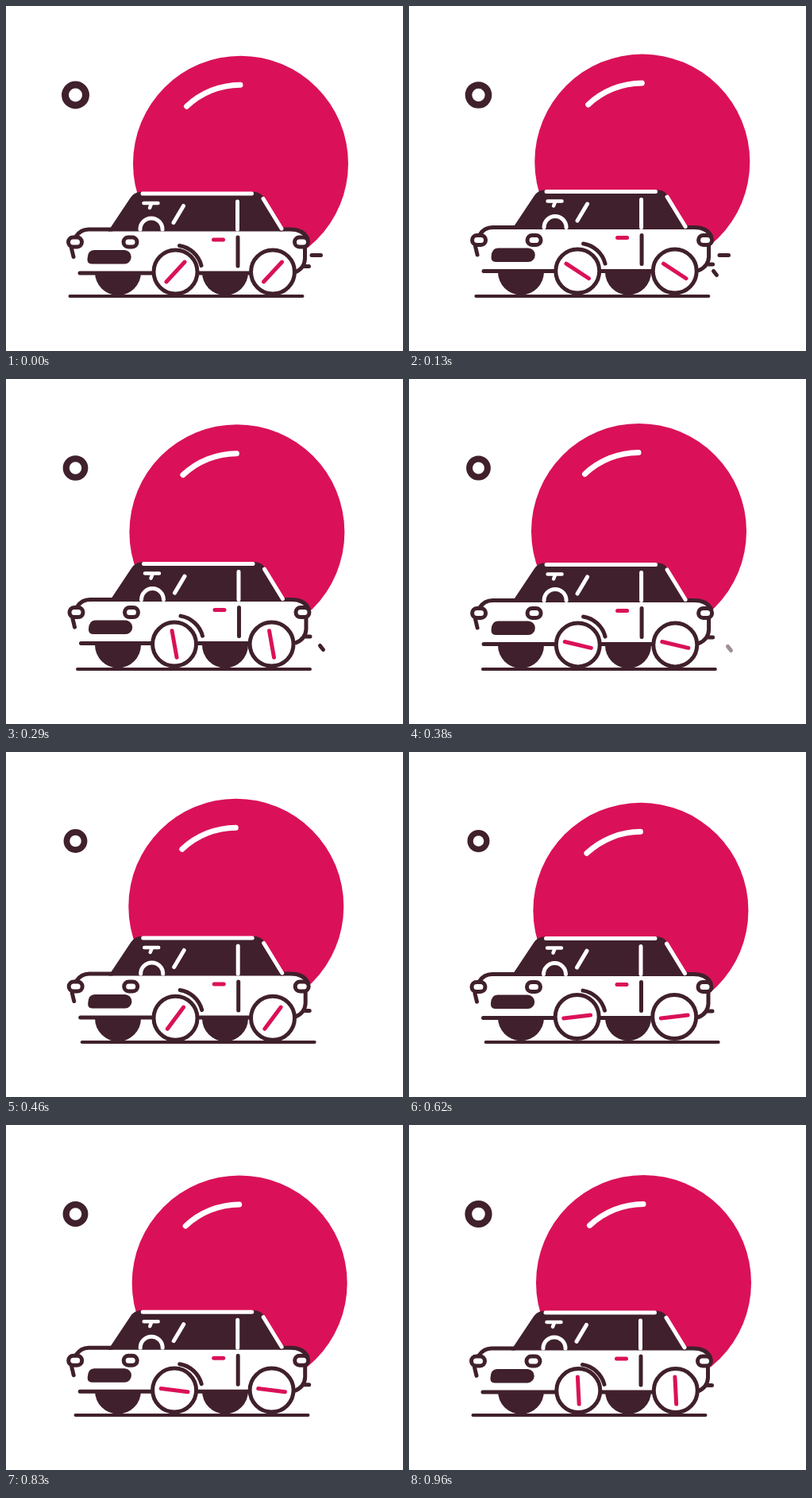
These frames come from a looping animation (500x434 px, 1000 ms). An HTML page:

```html
<!DOCTYPE html>
<html lang="en">
<head>
<meta charset="utf-8">
<title>Little car</title>
<style>
  html, body { margin: 0; width: 100%; height: 100%; overflow: hidden; background: #fff; }
  svg { display: block; width: 500px; height: 434px; }
  .line { fill: none; stroke-width: 5; stroke-linecap: round; stroke-linejoin: round; }
  .dark { stroke: #40202c; }
  .white { stroke: #fff; }
  .pink { stroke: #da1158; }
  .ink { fill: #40202c; }
  .paper { fill: #fff; }
</style>
</head>
<body>
<svg viewBox="0 0 500 434">
  <circle id="ring" r="13" class="line dark" style="stroke-width:9"/>

  <g id="ball">
    <circle r="135.5" fill="#da1158"/>
    <path class="line white" style="stroke-width:7" d="M-68-72A99 99 0 0 1-.5-99"/>
  </g>

  <path id="puffA" class="line dark" d="M-6 0H5.5"/>
  <path id="puffB" class="line dark" d="M-2-2.5L2 2.5"/>
  <path id="ground" class="line dark" style="stroke-width:4" d="M80.5 365H373.5"/>

  <g id="farWheels" class="ink">
    <circle cx="141" cy="335" r="29"/>
    <circle cx="276" cy="335" r="29"/>
  </g>

  <g id="body">
    <path class="line dark" d="M374 327.5H381.5"/>
    <path class="paper" d="M105 281H360Q378 283 378 297V318Q377 334 366 336H93L81 300Q90 283 105 281Z"/>
    <path class="ink" d="M128.5 283.5L156.5 241.5Q161 234.500 168 234H314Q321 235 324 240L348 283.5Z"/>
    <path class="line dark" d="M133 281H104Q94 281 88 290M346 281H358Q374 281 379.5 292
      M82.5 305L85 315.5M93 336H187M240 336H309
      M376.5 303V318Q376 330 364 335M292 291V327M218.5 301.5A34 34 0 0 1 246 326.5"/>
    <path class="ink" d="M111 307H149A8.5 8.5 0 0 1 149 324.5H108Q102 324.500 102.500 318Q103 307 111 307Z"/>
    <path class="line white" d="M172 236H309.5M324 242.5L347 280M291.5 246V281M223.5 251.5L211 272.5"/>
    <path class="line white" style="stroke-width:4.5" d="M173.5 248H191.5M183 249L181 254"/>
    <path class="line white" d="M169 281A14 14 0 1 1 197 281"/>
    <path class="line pink" d="M261.5 294H273.5"/>
    <g class="line dark" style="fill:#fff">
      <rect x="78.5" y="291" width="17" height="12" rx="6"/>
      <rect x="148" y="291" width="17" height="12" rx="6"/>
      <rect x="363.5" y="291" width="17" height="12" rx="6"/>
    </g>
  </g>

  <g id="wheels">
    <g transform="translate(213.5 334.5)">
      <circle r="27.5" class="line dark" style="fill:#fff"/>
      <path class="line pink spoke" d="M-17 0H17"/>
    </g>
    <g transform="translate(336 334.5)">
      <circle r="27.5" class="line dark" style="fill:#fff"/>
      <path class="line pink spoke" d="M-17 0H17"/>
    </g>
  </g>
</svg>
<script>
const STEPS = 24;
const keys = [0, 5, 9, 11, 15, 17, 23];
const tracks = {
  ballX: [295.5, 292.5, 289.5, 289.8, 291.9, 292.8, 295.5],
  ballY: [198.2, 194.5, 191.5, 194.2, 199.3, 199.4, 198.4],
  bodyX: [0, 1.6, 1.1, .7, .5, .4, 0],
  bodyY: [0, -3.7, -2.5, -2, -1.4, -1.4, -.1],
  wheelX: [0, -1.8, -.7, 0, -1.8, -2.4, -.2],
  wheelY: [0, -1.5, -.1, .2, -1.5, -1.3, -.4],
  groundX: [0, 6.7, 12.4, 15.2, 16.2, 14, 0]
};

// Smooth periodic curve through the key values of one track
function at(name, t) {
  const n = keys.length, v = tracks[name];
  const key = i => keys[(i + n) % n] + STEPS * Math.floor(i / n);
  const val = i => v[(i + n) % n];
  const slope = i => (val(i + 1) - val(i - 1)) / (key(i + 1) - key(i - 1));
  let i = n - 1;
  while (keys[i] > t) i--;
  const len = key(i + 1) - key(i), u = (t - key(i)) / len, w = 1 - u;
  return val(i) * (1 + 2 * u) * w * w + val(i + 1) * (3 - 2 * u) * u * u
    + len * u * w * (slope(i) * w - slope(i + 1) * u);
}

const $ = id => document.getElementById(id);
const spokes = document.querySelectorAll('.spoke');
const move = (id, x, y, more = '') =>
  $(id).setAttribute('transform', `translate(${x} ${y}) ${more}`);
const clamp = x => Math.max(0, Math.min(1, x));

function draw(ms) {
  const t = Math.floor((ms % 1000) * STEPS / 1000 + .25) % STEPS;

  const size = t < 15 ? 1 - t / 75 : .8 + (t - 15) / 45;
  move('ring', 87.5, 112, `scale(${size})`);
  move('ball', at('ballX', t), at('ballY', t));
  move('ground', at('groundX', t), 0);
  move('body', at('bodyX', t), at('bodyY', t));

  const wheelY = at('wheelY', t);
  move('wheels', at('wheelX', t), wheelY);
  move('farWheels', 0, wheelY / 2);
  spokes.forEach(s => s.setAttribute('transform', `rotate(${-47 - t * 33.3})`));

  move('puffA', 391 + 2 * t, 313.5);
  $('puffA').style.opacity = clamp((7 - t) / 3);
  move('puffB', 391.5 + 3 * (t - 5), 337 + .5 * (t - 5));
  $('puffB').style.opacity = t < 3 ? 0 : clamp((10.5 - t) / 3);
}

function loop() {
  draw(performance.now());
  requestAnimationFrame(loop);
}
loop();
</script>
</body>
</html>
```
